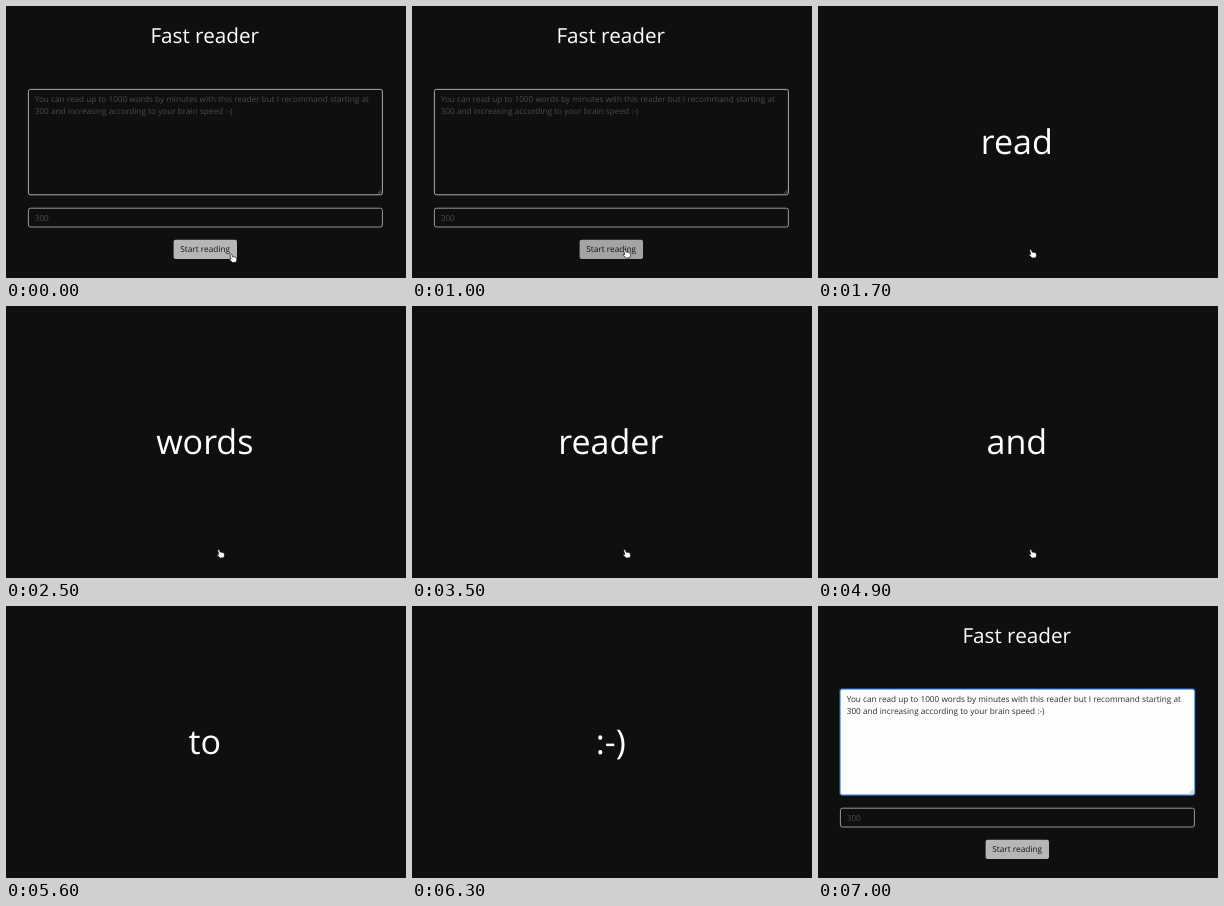
Write an HTML page that moves like this. It is 400 px wide and 272 px high and loops after 7.3 s.

```html
<!DOCTYPE html>
<html lang="en">
<head>
<meta charset="utf-8">
<title>Fast reader</title>
<style>
  html, body { margin: 0; width: 100%; height: 100%; overflow: hidden; background: #0f0f0f; }
  svg { display: block; width: 100vw; height: 100vh; }
  text { font-family: "Open Sans", "Noto Sans", sans-serif; font-size: 8.22px; text-rendering: geometricPrecision; }
  .mid { text-anchor: middle; }
  #title { font-size: 20.7px; fill: #fff; }
  #word { font-size: 34px; fill: #fff; }
  .hint { fill: #4b4b4b; }
</style>
</head>
<body>
<svg viewBox="0 0 400 272">
  <rect width="400" height="272" fill="#0f0f0f"/>
  <g id="form">
    <text id="title" class="mid" x="198.7" y="37.3">Fast reader</text>
    <rect id="ring" x="21" y="82" width="356.6" height="108" rx="3" fill="#123a70"/>
    <rect id="area" x="22.4" y="83.4" width="354" height="105.4" rx="2" stroke-width=".9"/>
    <path id="grip" d="M371.8 187.6l3.6-3.6M373.8 187.6l1.6-1.6" stroke-width=".6"/>
    <g id="copy">
      <text x="28.7" y="96">You can read up to 1000 words by minutes with this reader but I recommand starting at</text>
      <text x="28.7" y="108.3">300 and increasing according to your brain speed :-)</text>
    </g>
    <rect x="22.4" y="202.2" width="354" height="18.8" rx="2" fill="#0f0f0f" stroke="#a6a6a6" stroke-width=".9"/>
    <text class="hint" x="28.7" y="214.5">300</text>
    <rect id="button" x="167.6" y="233.7" width="63.4" height="19.4" rx="2"/>
    <text class="mid" x="199.2" y="246.4" fill="#151515" style="font-size:8.3px">Start reading</text>
  </g>
  <text id="word" class="mid" x="198.8" y="147.8"></text>
  <path id="hand" fill="#fff" stroke="#111" stroke-width=".7" stroke-linejoin="round"
    d="M1.7 .9C2.3 .3 3.1 .6 3.3 1.4L3.9 3.4C4.5 2.9 5.1 3.1 5.4 3.6C6 3.2 6.6 3.5 6.8 4C7.5 3.8 7.9 4.3 8 5L8.2 6.5L7.6 8.8L3.9 9.2L1 6.4C.3 5.6 1.2 5 1.9 5.5L2.5 5.8L1.5 2C1.4 1.5 1.4 1.2 1.7 .9Z"/>
</svg>
<script>
  const LOOP = 7300, HIDE = 1100, BEAT = 200, SHOW = 6500, CURSOR_END = 5600;
  const $ = id => document.getElementById(id);
  const set = (id, attrs) => {
    for (const key in attrs) $(id).setAttribute(key, attrs[key]);
  };
  const words = $("copy").textContent.trim().split(/\s+/);

  function handPlace(t) {
    if (t < 100) return [222.6, 247.4];
    if (t < 200) return [214.5, 244.6];
    return [210.3, 242.9];
  }

  function draw(t) {
    const reading = t >= HIDE && t < SHOW;
    const focused = t >= SHOW;
    const pressed = t >= 900 && t < HIDE;
    const k = Math.min(1, Math.max(0, (t - SHOW) / 150));

    set("form", { visibility: reading ? "hidden" : "visible" });
    set("ring", { opacity: k * k * (3 - 2 * k) });
    set("area", focused
      ? { fill: "#fdfdfd", stroke: "#7fb2ee" }
      : { fill: "#0f0f0f", stroke: "#bcbcbc" });
    set("grip", { stroke: focused ? "#777" : "#999" });
    set("copy", { fill: focused ? "#2b2f33" : "#4b4b4b" });
    set("button", { fill: pressed ? "#a4a4a4" : "#b6b6b6" });

    // One beat of blank screen comes before the first word.
    const index = Math.floor((t - HIDE) / BEAT) - 1;
    $("word").textContent = reading && words[index] || "";

    set("hand", {
      visibility: t < CURSOR_END ? "visible" : "hidden",
      transform: `translate(${handPlace(t)})`
    });
  }

  const start = performance.now();
  function tick() {
    draw((performance.now() - start) % LOOP);
    requestAnimationFrame(tick);
  }
  tick();
</script>
</body>
</html>
```
